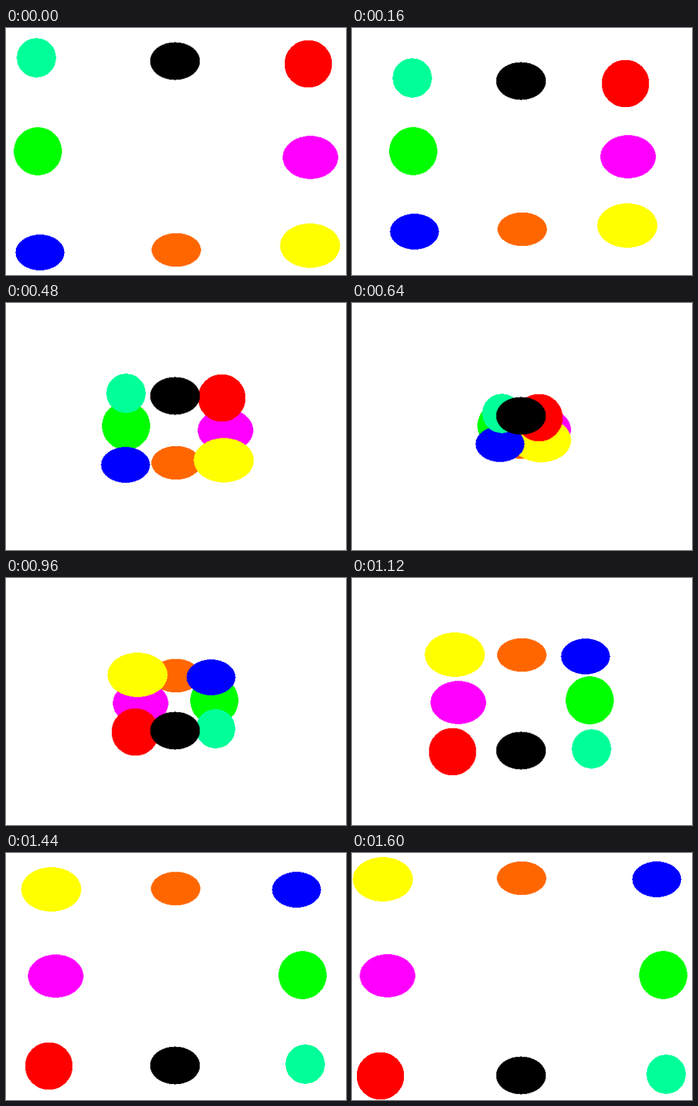
An HTML page for the animation above (1680 ms loop, 550 px wide and 400 px high).

```html
<!DOCTYPE html>
<html lang="en">
<head>
<meta charset="utf-8">
<title>Crossing ellipses</title>
<style>
  html, body { margin: 0; width: 100%; height: 100%; overflow: hidden; background: #fff; }
  svg { display: block; width: 550px; height: 400px; shape-rendering: crispEdges; }
  ellipse {
    transform: translate(var(--x0), var(--y0));
    animation: cross 1680ms infinite;
  }
  /* 20 poses of 80 ms, the last one held for one more */
  @keyframes cross {
    0% {
      transform: translate(var(--x0), var(--y0));
      animation-timing-function: steps(20, jump-none);
    }
    95.2381%, 100% { transform: translate(var(--x1), var(--y1)); }
  }
</style>
</head>
<body>
<svg viewBox="0 0 550 400">
  <ellipse rx="40" ry="27.3" fill="#f60" style="--x0:275.5px;--y0:359.4px;--x1:274.4px;--y1:40.8px"/>
  <ellipse rx="39" ry="39" fill="#0f0" style="--x0:51.5px;--y0:199.6px;--x1:503.5px;--y1:197.6px"/>
  <ellipse rx="45" ry="35" fill="#f0f" style="--x0:492.4px;--y0:209.6px;--x1:57.5px;--y1:198.8px"/>
  <ellipse rx="48.6" ry="36" fill="#ff0" style="--x0:492px;--y0:352.5px;--x1:50px;--y1:42.6px"/>
  <ellipse rx="39.6" ry="29" fill="#00f" style="--x0:55px;--y0:363.5px;--x1:493px;--y1:42.6px"/>
  <ellipse rx="31.8" ry="31.8" fill="#0f9" style="--x0:49.2px;--y0:48.3px;--x1:508.2px;--y1:358.3px"/>
  <ellipse rx="38.5" ry="38.5" fill="#f00" style="--x0:489px;--y0:58.1px;--x1:46px;--y1:361px"/>
  <ellipse rx="40.4" ry="30.6" fill="#000" style="--x0:273.4px;--y0:53.6px;--x1:273.4px;--y1:360.2px"/>
</svg>
</body>
</html>
```
